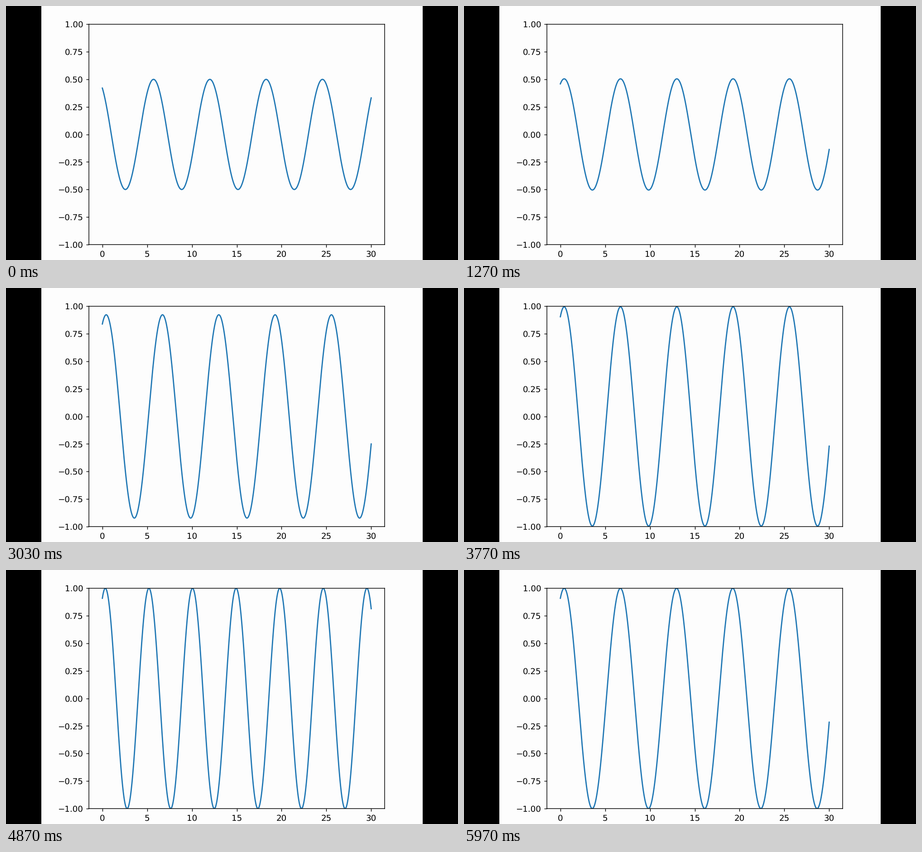
Animation, 998 px wide and 561 px high, one loop 6.01 s. Source, as a matplotlib script:

```python
import numpy as np
import matplotlib.pyplot as plt
from matplotlib.animation import FuncAnimation
from matplotlib.patches import Rectangle

W, H, DPI = 998, 561, 100
LOOP_MS, FRAMES, FPS = 6010, 180, 30

# A default 6.4 x 4.8 in chart, centred on the stage and cropped top and bottom
PLOT_W = 842.5
PLOT_H = PLOT_W * 0.75
ZOOM = PLOT_W / 640
INK = "black"
PAPER = "#fdfdfd"

plt.rcParams.update({
    "font.family": "DejaVu Sans",
    "path.snap": False,
    "text.hinting": "none",
})


def sigmoid(v):
    return 1 / (1 + np.exp(-v))


def smooth(u, steep=10):
    """Logistic ease from 0 to 1."""
    u = np.clip(u, 0, 1)
    low = sigmoid(-steep / 2)
    return (sigmoid(steep * (u - 0.5)) - low) / (1 - 2 * low)


def there_and_back(u):
    return smooth(1 - abs(2 * np.clip(u, 0, 1) - 1))


def wave(t):
    """Shift the phase, then grow the amplitude, then pulse the frequency."""
    phase = 1 + smooth(t)
    amp = 0.5 + 0.5 * smooth((t - 1) / 3)
    freq = 1 + 0.3 * there_and_back((t - 4) / 2)
    return amp * np.sin(phase - freq * x)


fig = plt.figure(figsize=(W / DPI, H / DPI), dpi=DPI, facecolor=PAPER)

for left, right in ((0, 78), (920, W)):
    fig.add_artist(Rectangle((left / W, 0), (right - left) / W, 1,
                             transform=fig.transFigure, fc=INK, lw=0, snap=True))

x0, y0 = (W - PLOT_W) / 2, (H - PLOT_H) / 2
ax = fig.add_axes([(x0 + 0.125 * PLOT_W) / W, (y0 + 0.11 * PLOT_H) / H,
                   0.775 * PLOT_W / W, 0.77 * PLOT_H / H], facecolor=PAPER)
ax.set(xlim=(-1.5, 31.5), ylim=(-1, 1),
       xticks=range(0, 31, 5), yticks=np.linspace(-1, 1, 9))
ax.tick_params(labelsize=10 * ZOOM, length=3.5 * ZOOM,
               pad=3.5 * ZOOM, width=0.8 * ZOOM)
for spine in ax.spines.values():
    spine.set_linewidth(0.8 * ZOOM)

x = np.linspace(0, 30, 1000)
curve, = ax.plot(x, wave(0), color="#1f77b4", lw=1.5 * ZOOM)


def update(n):
    curve.set_ydata(wave(n / FPS))
    return curve,


anim = FuncAnimation(fig, update, frames=FRAMES, interval=LOOP_MS / FRAMES,
                     repeat=True, repeat_delay=0)
plt.show()
```
